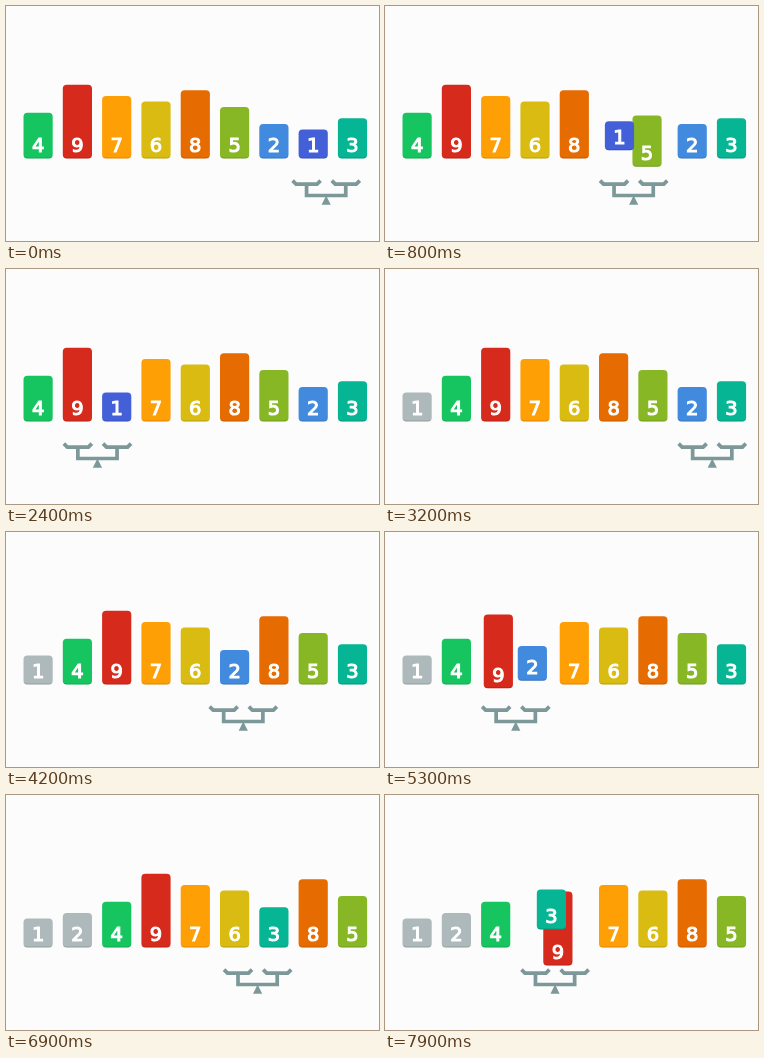
These frames come from a looping animation (373x235 px, 8000 ms). An HTML page:

```html
<!DOCTYPE html>
<html lang="en">
<head>
<meta charset="utf-8">
<title>Bubble sort with a balance</title>
<style>
  html, body { margin: 0; width: 100%; height: 100%; overflow: hidden; background: #fcfcfc; }
  svg { display: block; width: 373px; height: 235px; }
  text {
    font: 19.5px "DejaVu Sans", Verdana, sans-serif;
    text-anchor: middle;
    fill: #fff;
    stroke: #fff;
    stroke-width: 1.1px;
  }
  .edge { fill: #000; fill-opacity: .14; }
  #balance { fill: none; stroke: #7d9899; stroke-width: 3.7; }
  #balance .foot { fill: #7d9899; stroke: none; }
</style>
</head>
<body>
<svg viewBox="0 0 373 235">
  <g id="bars"></g>
  <g id="balance">
    <path d="M-33.2 174.6l3.5 3.5h21l3.5 -3.5M6 174.6l3.5 3.5h21l3.5 -3.5"/>
    <path d="M-19.2 178v11.5h39.2v-11.5"/>
    <path class="foot" d="M.4 189.5l4.6 9.2h-9.2z"/>
  </g>
</svg>
<script>
const LOOP = 8000, TICK = 100;
const MOVE = 266, WAIT = 300, SWAP = 134, RETURN = 200;
const FIRST_X = 32.1, GAP = 39.3, BASE = 152.5, LIFT = 18.5;
const START = [4, 9, 7, 6, 8, 5, 2, 1, 3];
const COLORS = ['#4460d8', '#428ade', '#05b593', '#17c560', '#88b726',
                '#d9bb12', '#ff9f06', '#e66b00', '#d62b1c'];
const DONE = '#adb9ba';
const LAST = START.length - 2;

// Each pass: when the balance leaves the rightmost pair, and where it stops.
const PASSES = [
  { leave: -48, stop: 0 },
  { leave: 3255, stop: 1 },
  { leave: 6220, stop: 2 }
];

const slotX = i => FIRST_X + GAP * i;
const clamp = v => Math.min(1, Math.max(0, v));

function buildTimeline() {
  const order = START.slice(), moves = [], swaps = [], finished = [];
  const trySwap = (at, pair) => {
    if (order[pair] < order[pair + 1]) return 0;
    [order[pair], order[pair + 1]] = [order[pair + 1], order[pair]];
    swaps.push({ at, pair });
    return SWAP;
  };
  let at = 0;
  PASSES.forEach(({ leave, stop }, n) => {
    if (n) {
      finished.push({ at, value: n });
      moves.push({ at, length: RETURN, from: stop - 1, to: LAST });
      trySwap(leave - SWAP, LAST);
    }
    at = leave;
    for (let pair = LAST - 1; pair >= stop; pair--) {
      moves.push({ at, length: MOVE, from: pair + 1, to: pair });
      at += WAIT + trySwap(at + WAIT, pair);
    }
  });
  return { moves, swaps, finished };
}

const { moves, swaps, finished } = buildTimeline();

function make(name, attrs, parent) {
  const el = document.createElementNS('http://www.w3.org/2000/svg', name);
  for (const key in attrs) el.setAttribute(key, attrs[key]);
  return parent.appendChild(el);
}

// Tallest first, so that smaller bars pass in front.
const bars = [];
const barLayer = document.getElementById('bars');
for (let v = 9; v >= 1; v--) {
  const g = make('g', {}, barLayer);
  const height = 29 + 5.6 * (v - 1);
  const body = make('rect', { x: -14.6, y: -height, width: 29.2, height, rx: 4 }, g);
  make('path', { class: 'edge', d: 'M-14.6 -4a4 4 0 0 0 4 4h21.2a4 4 0 0 0 4 -4a4 3 0 0 1 -4 3h-21.2a4 3 0 0 1 -4 -3z' }, g);
  make('text', { y: -6.6 }, g).textContent = v;
  bars[v] = { g, body };
}
const balance = document.getElementById('balance');

function place(value, x, y) {
  bars[value].g.setAttribute('transform', `translate(${x} ${y})`);
}

function draw(t) {
  const order = START.slice();
  let active = null;
  for (const { at, pair } of swaps) {
    const p = (t - at) / SWAP;
    if (p >= 1) [order[pair], order[pair + 1]] = [order[pair + 1], order[pair]];
    else if (p > 0) active = { pair, p };
  }
  order.forEach((value, i) => place(value, slotX(i), BASE));
  if (active) {
    const { pair, p } = active;
    const dy = LIFT * Math.sin(Math.PI * p);
    place(order[pair], slotX(pair + p), BASE + dy);
    place(order[pair + 1], slotX(pair + 1 - p), BASE - dy);
  }

  for (let v = 1; v <= 9; v++) {
    const done = finished.some(f => f.value === v && t >= f.at);
    bars[v].body.setAttribute('fill', done ? DONE : COLORS[v - 1]);
  }

  let pos = LAST;
  for (const m of moves) {
    if (t >= m.at) pos = m.from + (m.to - m.from) * clamp((t - m.at) / m.length);
  }
  balance.setAttribute('transform', `translate(${slotX(pos + .5)} 0)`);
}

const begin = performance.now();
function frame() {
  const t = (performance.now() - begin) % LOOP;
  draw(Math.floor(t / TICK) * TICK);
  requestAnimationFrame(frame);
}
frame();
</script>
</body>
</html>
```
